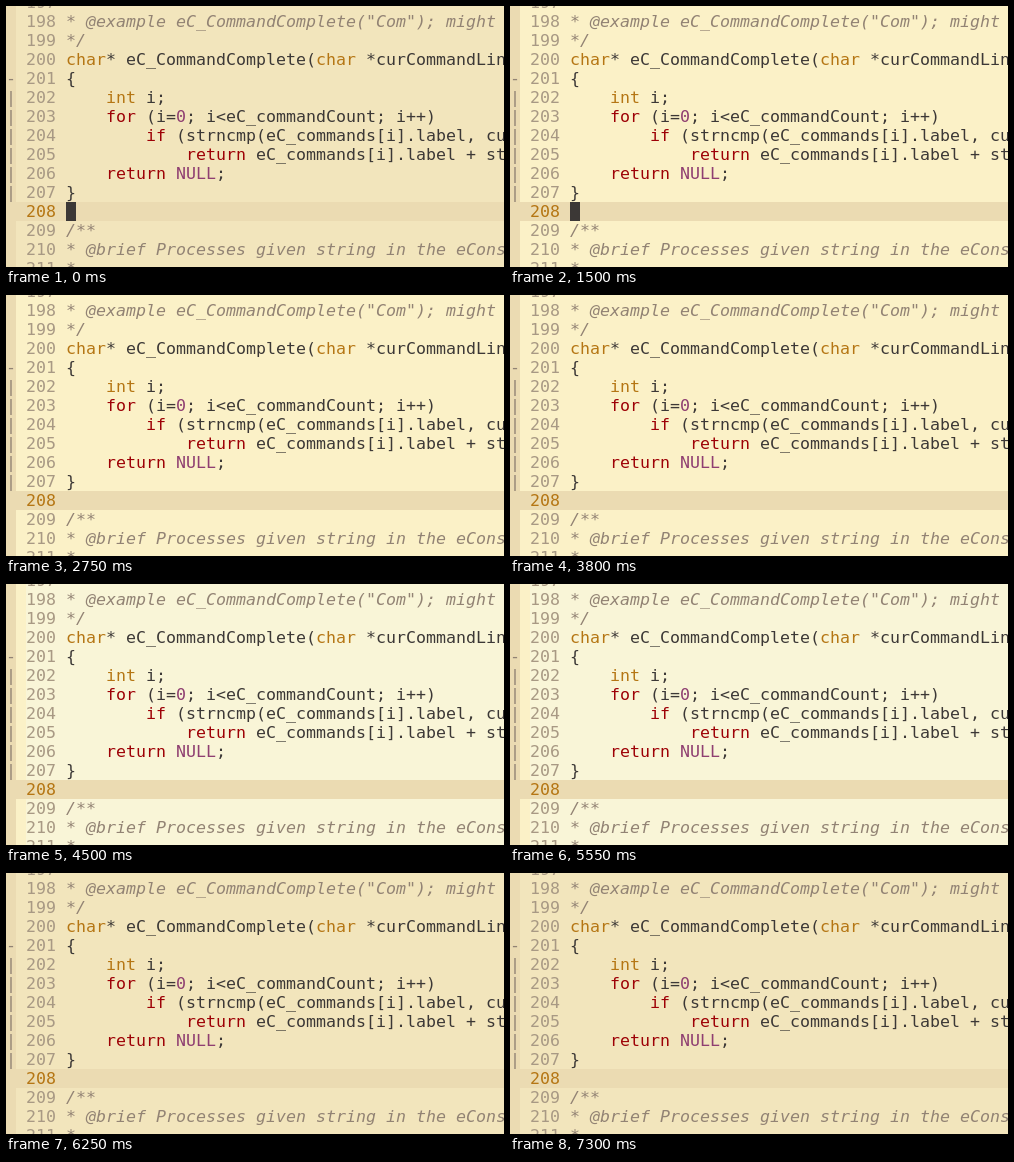
An HTML page for the animation above (8000 ms loop, 498 px wide and 261 px high).

```html
<!DOCTYPE html>
<html lang="en">
<head>
<meta charset="utf-8">
<style>
  html, body { margin: 0; width: 100%; height: 100%; overflow: hidden; }
  #editor {
    --bg: #f2e5bc;
    position: relative; width: 498px; height: 261px; overflow: hidden;
    background: var(--bg); color: #3c3836;
    font: 16.61px/19px "DejaVu Sans Mono", monospace; /* 10px per character */
  }
  #pad, #fold { position: absolute; top: 0; height: 100%; width: 10px; }
  #pad { left: 10px; background: var(--pad); }
  #fold { left: 0; background: #ebdbb2; }
  .row { position: absolute; left: 0; width: 100%; height: 19px; white-space: pre; }
  .row span { position: absolute; top: 0; }
  .mark { left: 0; color: #928374; }
  .number { left: 20px; color: #a89984; }
  .code { left: 60px; }
  .current { background: #ebdbb2; }
  .current .number, .code .type { color: #b57614; }
  .comment { color: #928374; font-style: italic; }
  .keyword { color: #9d0006; }
  .constant { color: #8f3f71; }
  #cursor { position: absolute; left: 60px; top: 196px; width: 10px; height: 19px; background: #3c3836; }
</style>
</head>
<body>
<div id="editor"><div id="pad"></div><div id="fold"></div></div>
<script>
const FIRST_LINE = 197, CURRENT_LINE = 208, ROW_HEIGHT = 19, CURRENT_TOP = 196;
const source = `
* @example eC_CommandComplete("Com"); might
*/
char* eC_CommandComplete(char *curCommandLin
{
    int i;
    for (i=0; i<eC_commandCount; i++)
        if (strncmp(eC_commands[i].label, cu
            return eC_commands[i].label + st
    return NULL;
}

/**
* @brief Processes given string in the eCons
*`.split("\n");

const editor = document.getElementById("editor");

function highlight(line) {
  const safe = line.replace(/</g, "&lt;");
  if (/^(\*|\/\*)/.test(line)) return `<i class="comment">${safe}</i>`;
  return safe.replace(/\b(?:(char|int)|(for|if|return)|(NULL|0))\b/g, (word, type, keyword) =>
    `<b class="${type ? "type" : keyword ? "keyword" : "constant"}" style="font-weight:400">${word}</b>`);
}

source.forEach((line, i) => {
  const number = FIRST_LINE + i;
  const mark = number === 201 ? "-" : number > 201 && number < 208 ? "|" : "";
  const row = document.createElement("div");
  row.className = number === CURRENT_LINE ? "row current" : "row";
  row.style.top = CURRENT_TOP + (number - CURRENT_LINE) * ROW_HEIGHT + "px";
  row.innerHTML = `<span class="mark">${mark}</span><span class="number">${number}</span>` +
    `<span class="code">${highlight(line)}</span>`;
  editor.append(row);
});

const cursor = document.createElement("div");
cursor.id = "cursor";
editor.append(cursor);

const SOFT = "#f2e5bc", MEDIUM = "#fbf1c7", HARD = "#f9f5d7";

function draw() {
  const t = performance.now() % 8000;
  const bg = t < 1500 || t >= 6250 ? SOFT : t < 4500 ? MEDIUM : HARD;
  editor.style.setProperty("--bg", bg);
  editor.style.setProperty("--pad", bg === HARD ? MEDIUM : bg);
  cursor.hidden = t >= 2750;
  requestAnimationFrame(draw);
}
draw();
</script>
</body>
</html>
```
